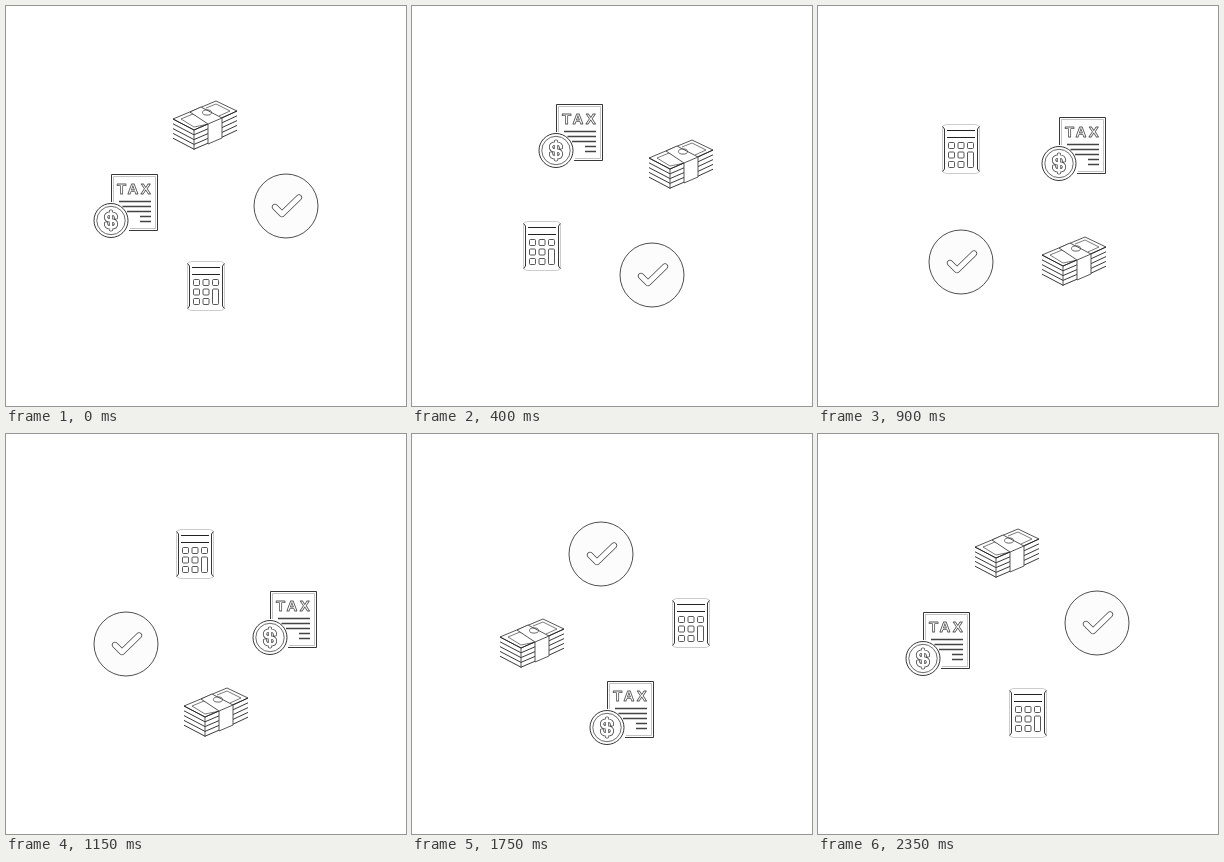
Animation, 400 px wide and 400 px high, one loop 2.4 s. Source, as an HTML page:

```html
<!DOCTYPE html>
<html lang="en">
<head>
<meta charset="utf-8">
<title>Tax icons in orbit</title>
<style>
  html, body { margin: 0; width: 100%; height: 100%; overflow: hidden; background: #fff; }
  svg { display: block; width: 100vw; height: 100vh; }
  g { fill: none; stroke: #444; stroke-width: .9; stroke-linejoin: round; }
  .dark { stroke: #222; }
  .light { stroke: #aaa; }
  .paper { fill: #fff; }
  .edge, .core { stroke-linecap: round; }
  .core { stroke: #fff; }
  text { font: bold 15px "Liberation Sans", Arial, sans-serif; letter-spacing: 2.4px; fill: #fff; stroke: #555; stroke-width: .8; }
</style>
</head>
<body>
<svg viewBox="0 0 400 400">
  <g id="check">
    <circle r="32" class="dark" style="fill:#fcfcfc" stroke-width=".8"/>
  </g>
  <g id="calculator">
    <rect x="-18.5" y="-24.5" width="37" height="49" rx="4" class="light" stroke-width=".6"/>
    <path class="dark" d="M-18.5-22.5L-16.5-20V20L-18.5 22.5M18.5-22.5L16.5-20V20L18.5 22.5"/>
    <path class="dark" d="M-14-18.5H14M-14-11.5H14" stroke-width="1.2"/>
  </g>
  <g id="tax">
    <path class="dark" d="M-14.5-4V-31.5H31.5V24.5H3"/>
    <path class="light" d="M-12.5-4V-29.5H29.5V22.5H4" stroke-width=".7"/>
    <text x="-9" y="-12">TAX</text>
    <path d="M-7-4.5H25M-3.5.5H25M1 5.5H25M14 10.5H25M14 15.5H25" stroke-width="1.4"/>
    <circle cx="-15" cy="14.5" r="17" class="paper dark"/>
    <circle cx="-15" cy="14.5" r="14.2" stroke-width=".8"/>
  </g>
  <g id="money">
    <path class="paper" d="M-32-7L11-25L32-15L-11 4Z"/>
    <path d="M-24-7L-12-12L9-3L-11 1ZM1-18L11-22L25-15L14-10" stroke-width=".7"/>
  </g>
</svg>
<script>
const icons = { check: 0, calculator: 90, tax: 180, money: 270 };
const byId = id => document.getElementById(id);

function add(id, tag, attrs) {
  const node = document.createElementNS("http://www.w3.org/2000/svg", tag);
  for (const key in attrs) node.setAttribute(key, attrs[key]);
  byId(id).append(node);
}

// A thick white stroke with a thin rim around it.
function outlined(id, d, width, rim, transform = "") {
  add(id, "path", { d, transform, class: "edge", "stroke-width": width });
  add(id, "path", { d, transform, class: "core", "stroke-width": width - 2 * rim });
}

outlined("check", "M-11 1L-4 8L13-8.5", 6.2, .7);
outlined("tax", "M5-3Q5-7 0-7Q-5-7-5-3.5Q-5 0 0 0Q5 0 5 3.5Q5 7 0 7Q-5 7-5 3M0-9V9", 4.2, .8,
  "translate(-15 14.5)");

// Keypad: the last column ends in one tall key.
for (let col = 0; col < 3; col++)
  for (let row = 0; row < 3; row++) {
    const tall = col === 2 && row === 1;
    if (col === 2 && row === 2) continue;
    add("calculator", "rect", { x: -12.5 + col * 9.5, y: -6.5 + row * 9.5,
      width: 6, height: tall ? 15.5 : 6, rx: 1 });
  }

// Stacked notes, then the paper band across them.
for (let i = 0; i < 5; i++) {
  const y = i * 4.8;
  add("money", "path", { class: "dark",
    d: `M-32 ${y - 7}L-11 ${y + 4}L3 ${y - 2}M17 ${y - 8}L32 ${y - 15}` });
}
add("money", "path", { class: "paper", d: "M-15-14L-4-19L17-8V12L3 18V-2Z" });
add("money", "path", { d: "M3-2L17-8M-11 4V24" });
add("money", "ellipse", { cx: 2, cy: -13.5, rx: 4.5, ry: 2.6, "stroke-width": .8 });

function draw() {
  const turn = Math.floor(performance.now() % 2400 / 50) * 7.5;
  for (const id in icons) {
    const angle = (icons[id] + turn) * Math.PI / 180;
    const x = Math.floor(200 + 80 * Math.cos(angle));
    const y = Math.floor(200 + 80 * Math.sin(angle));
    byId(id).setAttribute("transform", `translate(${x} ${y})`);
  }
  requestAnimationFrame(draw);
}
draw();
</script>
</body>
</html>
```
